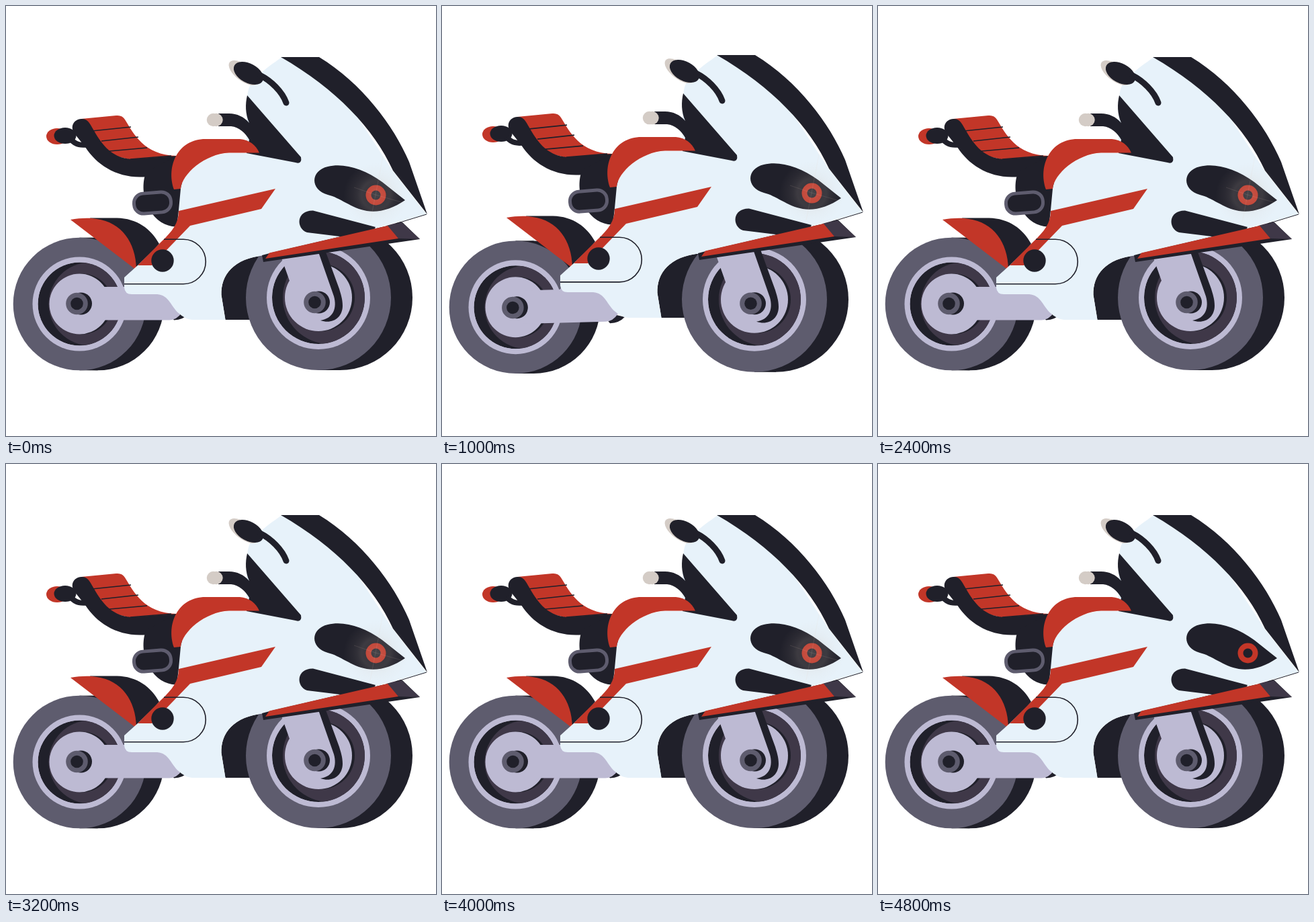
An HTML page with a canvas for the animation above (4.9 s loop, 640x640 px).

```html
<!DOCTYPE html>
<html lang="en">
<head>
<meta charset="utf-8">
<title>Motorbike</title>
<style>
html, body { margin: 0; width: 100%; height: 100%; overflow: hidden; background: #fff; }
canvas { display: block; width: 640px; height: 640px; }
</style>
</head>
<body>
<canvas id="stage" width="640" height="640"></canvas>
<script>
const ctx = document.getElementById('stage').getContext('2d');
const DARK = '#20202a', LIGHT = '#e7f2fa', RED = '#c23628', GRAY = '#5e5c6e';
const LILAC = '#bdbad3', PLUM = '#3f3848', BEIGE = '#d4ccc6';
const LOOP = 4900, BOUNCE = 800, STEP = 100;

function fill(color, d) {
  ctx.fillStyle = color;
  ctx.fill(new Path2D(d));
}
function line(color, width, d, cap = 'butt') {
  ctx.strokeStyle = color;
  ctx.lineWidth = width;
  ctx.lineCap = cap;
  ctx.stroke(new Path2D(d));
}
function oval(color, x, y, rx, ry = rx, turn = 0) {
  ctx.fillStyle = color;
  ctx.beginPath();
  ctx.ellipse(x, y, rx, ry, turn, 0, Math.PI * 2);
  ctx.fill();
}
function shifted(dy, draw) {
  ctx.save();
  ctx.translate(0, dy);
  draw();
  ctx.restore();
}

// Tyre with depth, rim ring, shaded hollow and inner disc.
function wheel(x, y, r, depth, rim, hollow, disc) {
  oval(DARK, x + depth, y, r);
  ctx.fillRect(x, y - r, depth, r * 2);
  oval(GRAY, x, y, r);
  oval(LILAC, x, y, rim);
  ctx.save();
  ctx.beginPath();
  ctx.arc(x, y, hollow, 0, Math.PI * 2);
  ctx.clip();
  oval(DARK, x, y, hollow);
  oval(PLUM, x + 16, y, hollow);
  ctx.restore();
  oval(DARK, x + 4, y, disc);
  oval(LILAC, x, y, disc);
}
function hub(x, y) {
  oval(DARK, x + 6, y, 16.5);
  oval(GRAY, x, y, 16.3);
  oval(DARK, x, y, 9.3);
}

function rearWheel() {
  wheel(109.5, 443.5, 98.8, 27, 70, 62, 45);
  fill(DARK, 'M236 450 L272 458 Q264 467 250 467.5 Z');
}
function swingArm() {
  fill(LILAC, 'M120 418 H176 L190 404 L262 420 V456 Q254 467.5 243 467.5 H120 Z');
  hub(105.5, 443);
}
function frontFender() {
  ctx.fillStyle = DARK;
  ctx.beginPath();
  ctx.moveTo(326.5, 467);
  ctx.lineTo(320.5, 430);
  ctx.bezierCurveTo(320, 400, 338, 376, 385, 371);
  ctx.arc(465, 434, 102, -2.474, 2.812, true);
  ctx.closePath();
  ctx.fill();
}
function frontWheel() {
  wheel(465, 434, 108, 32, 77, 69, 50);
}
function fork() {
  fill(LILAC, 'M404 358 L422 409 L430 440 H482 L490 436 L466 355 H404 Z');
  fill(DARK, 'M460 352 L488 432 C493 450 487 465 468 468 C486 474 501 464 501 446 C501 436 498 428 496 421 L470 350 Z');
  hub(459.5, 441);
}

function seat() {
  oval(RED, 76, 194, 16, 12);
  oval(DARK, 88, 193, 16.5, 12);
  line(DARK, 8, 'M96 198 C104 207 112 208 124 206');
  fill(RED, 'M112 168 L164 163 Q173 162 177 169 C190 190 205 222 254 223 L246 230 H190 L150 220 L118 180 Z');
  fill(DARK, 'M112 168 C121 167 125 175 130 184 C140 201 154 226 187 228 L255 223 L250 253 L210 254 C168 258 136 238 118 210 L102 190 C95 180 100 169 112 168 Z');
  line(DARK, 1.7, 'M128 186 L186 180 M142 201 L197 195 M154 216 L210 211 M185 228 L246 223');
}
function engine() {
  fill(DARK, 'M209 246 C202 262 203 286 214 304 C223 319 237 328 253 328.5 L262 300 L262 265 L258 222 Z');
  ctx.save();
  ctx.translate(218, 293);
  ctx.rotate(-0.08);
  ctx.beginPath();
  ctx.roundRect(-27.5, -15, 55, 30, 14);
  ctx.fillStyle = DARK;
  ctx.fill();
  ctx.strokeStyle = GRAY;
  ctx.lineWidth = 5;
  ctx.stroke();
  ctx.restore();
}
function rearFender() {
  fill(DARK, 'M125 315.5 H165 C195 316 216 332 228 354 L200 386 L193 391 L140 330 Z');
  fill(RED, 'M96 318 C110 315.5 125 315 135 317 C172 322 193 352 194 391 L192 391.5 Z');
}
function shell() {
  fill(LIGHT, 'M411 76 C395 87 372 103 364 117 C358 127 358 140 358 219 H332 C296 220 262 250 260 272 L257 304 L254 330 L196 386 L176 404 V419 Q177 429 187 429 H225 C243 430 246 449 258 458 C266 465 272 467 280 467 H326.5 L320.5 430 C320 400 338 376 385 371 L548 331 L626 310 L576 246 L500 130 Z');
  fill(DARK, 'M409 76 H466 C530 115 577 178 600 232 L627 310 L576 245 C547 182 492 124 409 76 Z');
  fill(DARK, 'M359 133 L439 225 Q441 236 431 233 L358 219 L362 199 C356 189 347 180 335 179 H316 V160 H332 C344 160 354 165 362 174 C356 160 356 146 359 133 Z');
  oval(BEIGE, 308.5, 169.5, 9.7);
  oval(BEIGE, 313, 169.5, 9.7);
  fill(RED, 'M250 273 C238 238 256 198 297 198 H348 C362 199 372 207 377 218.5 H332 C296 220 262 250 260 272 Z');
  oval(BEIGE, 353.5, 99.5, 26, 12, 0.65);
  oval(DARK, 361, 100, 24, 14.3, 0.5);
  line(DARK, 9, 'M378 103 C394 111 411 127 417 144', 'round');

  fill(RED, 'M257 305 L401 272 L380 302 L274 327 L217 386 H196 L231 351 C248 335 257 323 257 305 Z');
  line(DARK, 1.6, 'M235 347.2 H264 A33.3 33.3 0 0 1 264 413.8 H176');
  oval(DARK, 233, 379, 16.7);
}
function nose() {
  fill(DARK, 'M457 304.5 L550 329 L548 333 L505 344 L448 337 C431 331 432 304 457 304.5 Z');
  fill(DARK, 'M381 371 L396 367 L568 327 L590 322 L616 347 L383 381 Z');
  fill(PLUM, 'M566 327 L588 321 L616 347 L584 346 Z');
  fill(RED, 'M386 376 L392 367.5 L568 327 L584 346 Z');
  line(DARK, 1, 'M626 310 L580 324');
  fill(DARK, 'M479 239 C502 233 533 242 560 262 L594 289 C575 302 555 308 537 305 C514 301 497 285 479 281 C452 273 453 245 479 239 Z');
  oval(RED, 550.5, 281.5, 15);
  oval(DARK, 550.5, 281.5, 7);
}
function flare() {
  const x = 550.5, y = 281.5, r = 48;
  const glow = ctx.createRadialGradient(x, y, 0, x, y, r);
  const stops = [[0, 0.24], [0.28, 0.15], [0.45, 0.17], [0.58, 0.1], [0.72, 0.06], [1, 0]];
  for (const [at, alpha] of stops) glow.addColorStop(at, `rgba(205,190,178,${alpha})`);
  oval(glow, x, y, r);
  line('rgba(225,205,190,.12)', 1, 'M550 281 L561 224 M550 281 L518 270 M550 281 L592 293 M550 281 L542 322');
}

// 0 at rest, 1 at full lift, eased both ways.
function lift(t) {
  const p = (t % BOUNCE) / BOUNCE;
  const u = p < 0.5 ? p * 2 : 2 - p * 2;
  return u * u * (3 - 2 * u);
}

function draw(t) {
  const k = lift(t);
  ctx.fillStyle = '#fff';
  ctx.fillRect(0, 0, 640, 640);

  shifted(9.4 * k, rearWheel);
  ctx.save();
  ctx.translate(322, 450);
  ctx.rotate(-0.055 * k);
  ctx.translate(-322, -450);
  swingArm();
  ctx.restore();

  shifted(-5.9 * k, frontFender);
  shifted(5.6 * k, frontWheel);
  shifted(3.5 * k, fork);

  shifted(-5.9 * k, () => {
    rearFender();
    seat();
    engine();
    shell();
    nose();
    if (t % BOUNCE < BOUNCE / 2 && t < BOUNCE * 6) flare();
  });
}

const start = performance.now();
function tick() {
  const t = (performance.now() - start) % LOOP;
  draw(Math.floor(t / STEP) * STEP);
  requestAnimationFrame(tick);
}
tick();
</script>
</body>
</html>
```
